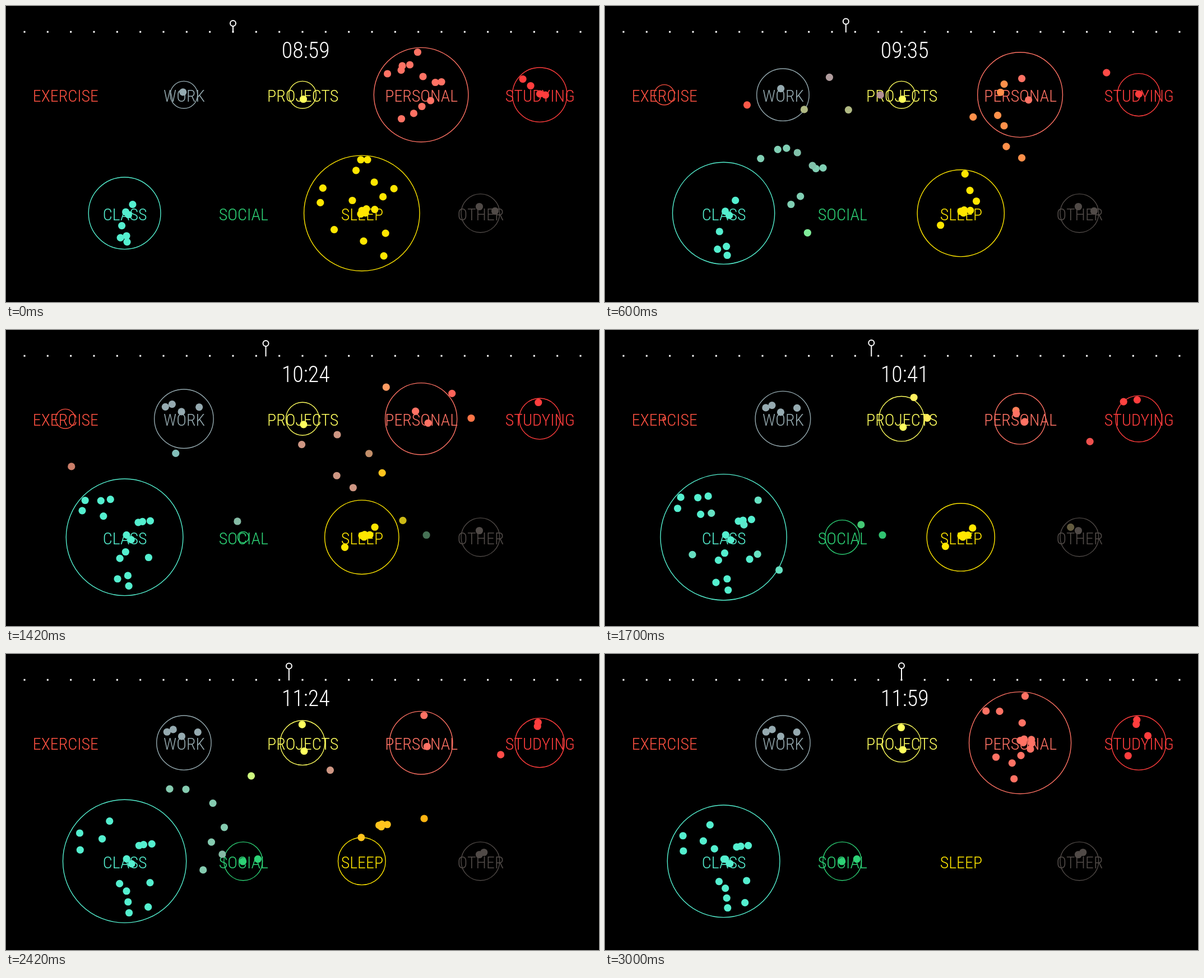
Write an HTML page with a canvas that moves like this. It is 1058 px wide and 529 px high and loops after 3.02 s.

```html
<!DOCTYPE html>
<html lang="en">
<head>
<meta charset="utf-8">
<title>A day in dots</title>
<style>
  html, body { margin: 0; width: 100%; height: 100%; overflow: hidden; background: #000; }
  svg, canvas { position: absolute; left: 0; top: 0; width: 1058px; height: 529px; }
  text {
    font-family: "Roboto Condensed", Roboto, "Open Sans", sans-serif;
    font-stretch: condensed;
    font-weight: 300;
    font-size: 30px;
    text-anchor: middle;
  }
  #clock { font-size: 40px; fill: #fff; }
</style>
</head>
<body>
<svg id="labels" viewBox="0 0 1058 529"><text id="clock" x="534.8" y="93.3"></text></svg>
<canvas id="stage" width="1058" height="529"></canvas>
<script>
const W = 1058, H = 529, LOOP = 3020, STEP = 20;
const UNIT = 24.33;   // ring radius for a single dot
const DOT = 6.6, PAD = 7;

const ctx = document.getElementById('stage').getContext('2d');
const labels = document.getElementById('labels');
const clock = document.getElementById('clock');

// key, label, colour
const places = [
  ['E', 'EXERCISE', [251, 80, 64]],
  ['W', 'WORK', [149, 170, 176]],
  ['P', 'PROJECTS', [255, 255, 94]],
  ['R', 'PERSONAL', [255, 114, 100]],
  ['T', 'STUDYING', [255, 61, 61]],
  ['C', 'CLASS', [84, 239, 207]],
  ['S', 'SOCIAL', [45, 210, 118]],
  ['L', 'SLEEP', [255, 230, 0]],
  ['O', 'OTHER', [80, 74, 71]]
].map(([key, name, rgb], i) => ({
  key, name, rgb,
  x: W / 5 * (i < 5 ? i + 0.5 : i - 4),
  y: H * (i < 5 ? 0.3 : 0.7)
}));
const byKey = Object.fromEntries(places.map(p => [p.key, p]));

// place at each full hour, then position inside the ring (unit disc)
const dots = [
  ['WWWW', -.094, -.28], ['PPPP', .088, .45],
  ['RTTT', -.08, -.986], ['RCCC', -.26, -.695], ['RCCR', -.435, -.67],
  ['RWWW', -.46, -.57], ['RCCC', -.777, -.488], ['RRCR', .044, -.423],
  ['RCCC', .328, -.287], ['RCCC', .471, -.3], ['RRRR', .219, .133],
  ['RCCR', .018, .269], ['RCTR', -.17, .43], ['RECT', -.454, .554],
  ['TCCR', -.724, -.676], ['TCCC', -.388, -.388], ['TTPC', .007, -.04],
  ['TWCR', .247, .007],
  ['CCCC', .25, -.272], ['CCCC', .035, -.04], ['CCCC', .12, .045],
  ['CCCC', -.087, .389], ['CCCR', -.129, .765], ['CCCC', .06, .705],
  ['CCCC', .077, .894],
  ['LRPP', -.019, -.993], ['LLRR', .106, -.993], ['LRTT', -.107, -.795],
  ['LLOO', .231, -.576], ['LWWW', -.722, -.467], ['LWWW', .596, -.456],
  ['LLLT', .393, -.305], ['LRRC', -.175, -.237], ['LRCC', -.769, -.196],
  ['LLLR', .085, -.08], ['LLLR', .24, -.07], ['LLLR', -.512, .304],
  ['LCCC', .44, .372], ['LRCC', .033, .518], ['LRCC', .408, .794],
  ['LRSS', -.02, .015], ['LLLR', .003, -.05], ['LLLR', .067, -.005],
  ['OOOO', -.07, -.43], ['OOSS', .953, -.14]
].map(([route, u, v]) => ({ route, u, v }));

for (const p of places) {
  p.radii = [0, 1, 2, 3].map(h =>
    UNIT * Math.sqrt(dots.filter(d => d.route[h] === p.key).length));
  const el = document.createElementNS('http://www.w3.org/2000/svg', 'text');
  el.setAttribute('x', p.x + 0.6);
  el.setAttribute('y', p.y + 12.3);
  el.setAttribute('fill', css(p.rgb));
  el.textContent = p.name;
  labels.append(el);
}

function css(rgb) { return `rgb(${rgb.map(Math.round).join()})`; }
function mix(a, b, k) { return a + (b - a) * k; }
function ease(s) { return s < 0.5 ? 4 * s ** 3 : 1 - (2 - 2 * s) ** 3 / 2; }
function two(n) { return String(n).padStart(2, '0'); }

function spot(d, hour) {
  const p = byKey[d.route[hour]];
  const r = Math.max(0, p.radii[hour] - PAD);
  return { x: p.x + d.u * r, y: p.y + d.v * r, rgb: p.rgb };
}

function circle(x, y, r) {
  ctx.beginPath();
  ctx.arc(x, y, r, 0, 2 * Math.PI);
}

function drawTimeline(min) {
  ctx.fillStyle = ctx.strokeStyle = '#fff';
  const gap = 124 / 3;
  for (let i = 0; i <= 24; i++) ctx.fillRect(33 + i * gap - 1.5, 44.7, 3, 3);
  const x = 33 + gap * (9 + min / 60);
  const y = 21 + 34.1 * (1 - Math.cos(Math.PI * (180 - min) / 720));
  ctx.lineWidth = 2;
  circle(x, y, 5);
  ctx.stroke();
  ctx.beginPath();
  ctx.moveTo(x, y + 5);
  ctx.lineTo(x, 47.3);
  ctx.stroke();
}

function draw(t) {
  const min = Math.floor(Math.floor(t / STEP) * 6 / 5);
  const hour = Math.min(2, Math.floor(min / 60));
  const k = ease(min / 60 - hour);

  ctx.clearRect(0, 0, W, H);
  drawTimeline(min);
  const now = 539 + min;
  clock.textContent = two(Math.floor(now / 60)) + ':' + two(now % 60);

  ctx.lineWidth = 1.4;
  for (const p of places) {
    const r = mix(p.radii[hour], p.radii[hour + 1], k);
    if (r < 0.1) continue;
    ctx.strokeStyle = css(p.rgb);
    circle(p.x, p.y, r);
    ctx.stroke();
  }
  for (const d of dots) {
    const a = spot(d, hour), b = spot(d, hour + 1);
    ctx.fillStyle = css(a.rgb.map((c, i) => mix(c, b.rgb[i], k)));
    circle(mix(a.x, b.x, k), mix(a.y, b.y, k), DOT);
    ctx.fill();
  }
}

function tick() {
  draw(performance.now() % LOOP);
  requestAnimationFrame(tick);
}
tick();
</script>
</body>
</html>
```
